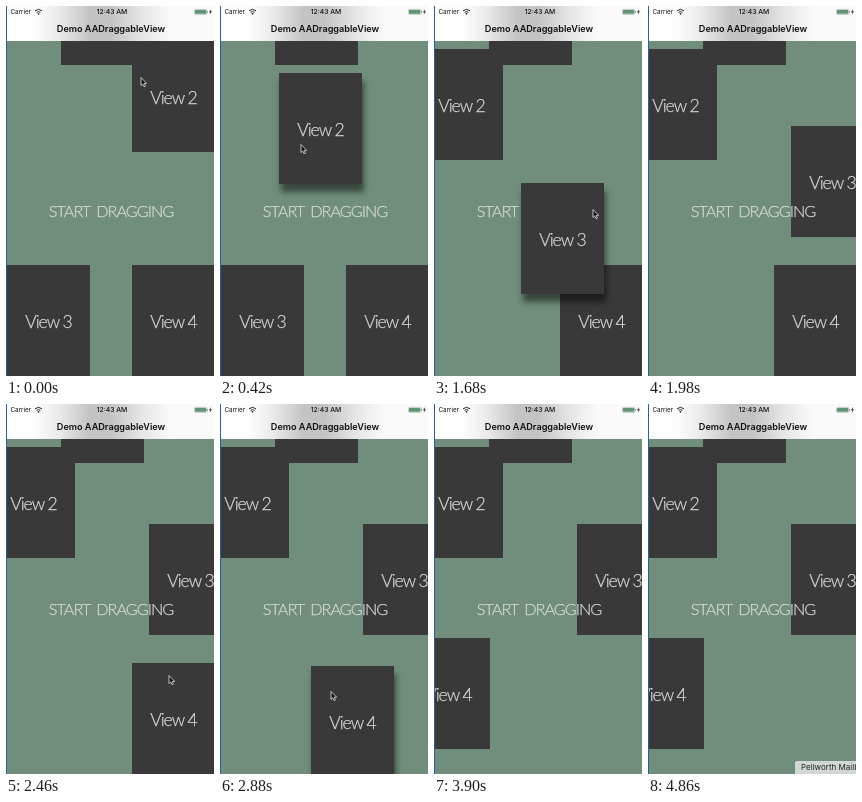
These frames come from a looping animation (208 px wide and 370 px high, 4.92 s). An HTML page:

```html
<!DOCTYPE html>
<html lang="en">
<head>
<meta charset="utf-8">
<title>Draggable views</title>
<style>
  html, body { margin: 0; width: 100%; height: 100%; overflow: hidden; }
  #stage { position: relative; width: 208px; height: 370px; overflow: hidden; background: #708e7b; }
  #stage > * { position: absolute; }
  .view, #hint {
    display: flex; align-items: center; justify-content: center; white-space: pre;
    font: 300 17.6px Lato, sans-serif; letter-spacing: -1px; color: #d6dad7; -webkit-text-stroke: .25px;
  }
  .view { left: 0; top: 0; z-index: 1; width: 83px; height: 111px; padding-top: 2px; box-sizing: border-box; background: #393939; }
  .view.lifted { z-index: 3; box-shadow: 2px 8px 6px rgba(0, 0, 0, .5); }
  #hint { z-index: 2; left: 0; top: 190px; width: 210px; height: 28px; font-size: 16.3px; word-spacing: 3px; }
  #bar {
    z-index: 4; left: 0; top: 0; width: 208px; height: 35px;
    background: linear-gradient(90deg, #fdfdfd 14%, #e9e9e9 26%, #c4c4c4 40%, #c3c3c3 50%, #e5e5e5 65%, #fafafa 79%, #fafafa);
    font-family: Inter, sans-serif; color: #111;
  }
  #bar span { position: absolute; white-space: nowrap; line-height: 10px; }
  #bar svg { position: absolute; left: 0; top: 0; }
  #carrier { left: 4.5px; top: 1px; font-size: 6.3px; }
  #clock { left: 0; top: 1px; width: 212px; text-align: center; font-size: 6.8px; font-weight: 500; }
  #title { left: 0; top: 18px; width: 210px; text-align: center; font-size: 9.15px; font-weight: 600; }
  #edge { z-index: 4; left: 0; top: 0; width: 1px; height: 370px; background: #285f9c; }
  #tip {
    z-index: 5; left: 147px; top: 357px; width: 80px; height: 20px; padding-left: 6px; border-radius: 2px;
    background: #cfd8d2; color: #222; font: 8px/13px Inter, sans-serif; white-space: nowrap;
  }
  #cursor { z-index: 6; left: 0; top: 0; overflow: visible; }
</style>
</head>
<body>
<div id="stage">
  <div id="hint">START DRAGGING</div>
  <div id="bar">
    <svg width="208" height="35">
      <g fill="none" stroke="#222" stroke-width="1">
        <path d="M29 4.8q3.5-3 7 0M30.6 6.4q1.9-1.6 3.8 0"/>
        <rect x="188.4" y="3.4" width="12.4" height="5" rx="1" stroke="#a9b9af" stroke-width=".7"/>
      </g>
      <circle cx="32.5" cy="7.8" r=".9" fill="#222"/>
      <path d="M189 4h11.2v3.8h-11.2zM201.3 5h.8v2h-.8z" fill="#639375"/>
      <path d="M205 3l-2 3.2h1.3l-.6 2.6 2.3-3.5h-1.4z" fill="#333"/>
    </svg>
    <span id="carrier">Carrier</span>
    <span id="clock">12:43 AM</span>
    <span id="title">Demo AADraggableView</span>
  </div>
  <div id="edge"></div>
  <div id="tip">Pellworth Mailbox</div>
  <svg id="cursor" width="8" height="12">
    <path d="M0 .5v8l1.7-1.6 1.3 2.8 1.4-.6-1.2-2.7h2.4z" fill="#111" stroke="#e8e8e8" stroke-width=".8"/>
  </svg>
</div>
<script>
  const LOOP = 4920, STEP = 60;
  const stage = document.getElementById('stage');
  const cursor = document.getElementById('cursor');
  const tip = document.getElementById('tip');

  // Pointer path: time, x, y
  const path = [
    [0, 135, 71], [180, 148, 106], [420, 81, 138], [780, 8, 114], [840, 8, 114],
    [1200, 88, 282], [1290, 73, 285], [1680, 159, 203], [1980, 215, 146], [2040, 215, 146],
    [2160, 197, 190], [2460, 163, 271], [2640, 146, 284], [2700, 146, 284], [3180, 24, 293],
    [3780, -7, 259], [3900, -7, 259], [4320, 140, 338], [4560, 186, 384], [LOOP, 186, 384]
  ];

  // Home position and the time span of each drag
  const views = [
    { x: 55, y: -52, from: 0, to: 0 },
    { x: 126, y: 35, from: 180, to: 780 },
    { x: 1, y: 259, from: 1290, to: 1980 },
    { x: 126, y: 259, from: 2700, to: 3840 }
  ];
  views.forEach((view, i) => {
    view.el = document.createElement('div');
    view.el.className = 'view';
    view.el.textContent = 'View ' + (i + 1);
    stage.append(view.el);
  });

  const slope = (i, axis) => (path[i + 1][axis] - path[i][axis]) / (path[i + 1][0] - path[i][0]);

  // Harmonic mean of neighbouring slopes, zero at turns and rests
  function tangent(i, axis) {
    if (i === 0 || i === path.length - 1) return 0;
    const a = slope(i - 1, axis), b = slope(i, axis);
    return a * b > 0 ? 2 * a * b / (a + b) : 0;
  }

  function pointer(t) {
    const i = path.findIndex((p, k) => k < path.length - 1 && t < path[k + 1][0]);
    const a = path[i], b = path[i + 1], span = b[0] - a[0], u = (t - a[0]) / span, v = 1 - u;
    return [1, 2].map(axis =>
      v * v * (1 + 2 * u) * a[axis] + u * u * (3 - 2 * u) * b[axis] +
      span * u * v * (v * tangent(i, axis) - u * tangent(i + 1, axis)));
  }

  const place = (el, x, y) => { el.style.transform = `translate(${x}px, ${y}px)`; };

  function draw(now) {
    const t = Math.floor(now % LOOP / STEP) * STEP;
    place(cursor, ...pointer(t));
    for (const { el, x, y, from, to } of views) {
      const [x0, y0] = pointer(from);
      const [x1, y1] = pointer(Math.min(Math.max(t, from), to));
      place(el, Math.round(x + x1 - x0), Math.round(y + y1 - y0));
      el.classList.toggle('lifted', t > from && t < to);
    }
    tip.hidden = t < 4620;
  }

  const start = performance.now();
  function tick() {
    draw(performance.now() - start);
    requestAnimationFrame(tick);
  }
  tick();
</script>
</body>
</html>
```
